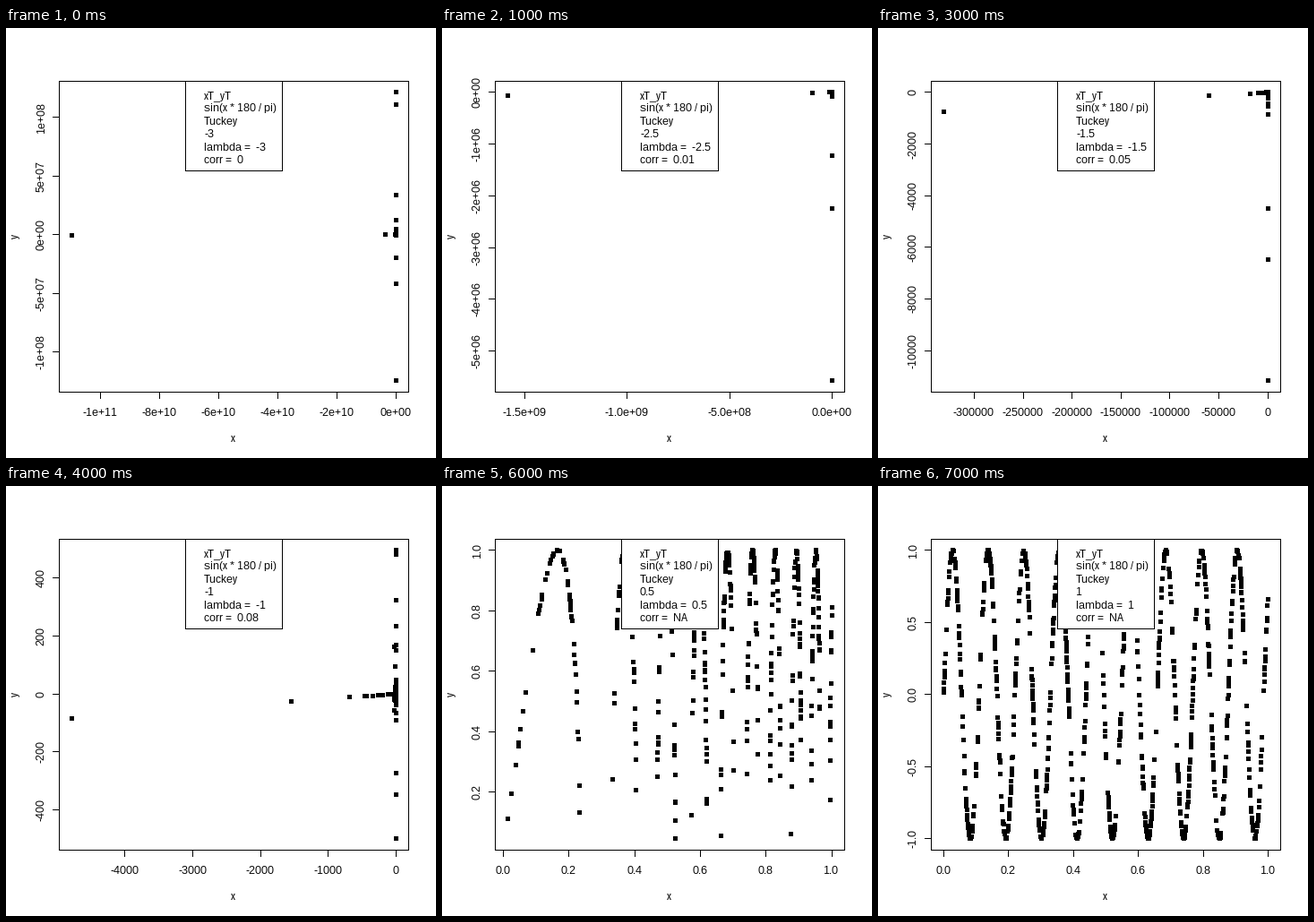
Write a matplotlib script that moves like this. It is 480x480 px and loops after 8000 ms.

```python
import numpy as np
import matplotlib.pyplot as plt
from matplotlib.animation import FuncAnimation
from matplotlib.collections import PatchCollection
from matplotlib.patches import Circle, Rectangle

plt.rcParams["font.family"] = "Liberation Sans"
plt.rcParams["font.size"] = 12
plt.rcParams["text.hinting"] = "native"
plt.rcParams["text.hinting_factor"] = 1

SIZE, DPI = 480, 72          # at 72 dpi one point is one pixel
LEFT, RIGHT, TOP, BOTTOM = 59.04, 449.76, 59.04, 406.56
FREQ = 180 / np.pi

# lambda and correlation shown in the legend
STEPS = [(-3, "0"), (-2.5, "0.01"), (-2, "0.01"), (-1.5, "0.05"),
         (-1, "0.08"), (-0.5, "0.18"), (0.5, "NA"), (1, "NA")]

# smallest x values, which become the outliers on the left
SMALL_X = [.000209, .000648, .001466, .00214, .0023, .0029, .00384, .00493,
           .0081]

# zero crossing number and 1/y of the points closest to the zero line
NEAR_ZERO = [
    (5, 499.5), (8, 347.5), (14, 272), (5, 91), (6, 67), (1, 57),
    (13, -495), (4, -480.5), (9, -324), (16, -233), (11, -170),
    (1, -163), (7, -150), (3, -96),
]


def sample_x():
    x = np.random.default_rng(7).uniform(0.0085, 0.9995, 980)
    x = x[np.abs(np.sin(x * FREQ)) > 0.02]
    near = [(k * np.pi + (-1) ** k * np.arcsin(1 / inv)) / FREQ
            for k, inv in NEAR_ZERO]
    return np.concatenate([x, near, SMALL_X, [0.9995]])


X = sample_x()
Y = np.sin(X * FREQ)


def tukey(values, lam):
    with np.errstate(invalid="ignore"):
        return np.sign(lam) * np.power(values, float(lam))


def scale(values, start, end):
    """Map the data range, widened by 4% on each side, to start..end."""
    low, high = np.nanmin(values), np.nanmax(values)
    pad = 0.04 * (high - low)
    low, high = low - pad, high + pad
    return low, high, lambda v: start + (v - low) / (high - low) * (end - start)


def pretty_ticks(low, high):
    """Ticks at 1, 2 or 5 times a power of ten, about five of them."""
    cell = (high - low) / 5
    base = step = 10.0 ** np.floor(np.log10(cell))
    for factor, bias in ((2, 0.8), (5, 1.7), (10, 0.8)):
        if factor * base - cell < bias * (cell - step):
            step = factor * base
    numbers = np.arange(np.ceil(low / step), np.floor(high / step) + 1)
    return numbers * step + 0.0, step


def tick_labels(ticks, step):
    """Fixed notation unless scientific notation is shorter."""
    decimals = max(0, -int(np.floor(np.log10(step))))
    fixed = [f"{t:.{decimals}f}" for t in ticks]
    short = [f"{t:.0e}" for t in ticks]
    if not np.allclose([float(s) for s in short], ticks):
        short = [f"{t:.1e}" for t in ticks]
    return fixed if max(map(len, fixed)) <= max(map(len, short)) else short


fig = plt.figure(figsize=(SIZE / DPI, SIZE / DPI), dpi=DPI, facecolor="white")
ax = fig.add_axes([0, 0, 1, 1])


def line(xs, ys):
    ax.plot(xs, ys, color="black", lw=1, antialiased=False,
            solid_capstyle="projecting")


def box(x0, y0, x1, y1, fill, z):
    ax.add_patch(Rectangle((x0, y0), x1 - x0, y1 - y0, facecolor=fill,
                           edgecolor="black", lw=1, antialiased=False,
                           joinstyle="miter", zorder=z))


def label(x, y, text, rotation=0, ha="center"):
    ax.text(x, y, text, rotation=rotation, rotation_mode="anchor", ha=ha,
            va="baseline", color="black", zorder=6)


def dots(xs, ys):
    centres = np.floor(np.column_stack([xs, ys])) + 0.5
    ax.add_collection(PatchCollection(
        [Circle(c, 2.5) for c in centres], facecolor="black", linewidth=0,
        antialiased=False, zorder=3))


def draw(i):
    lam, corr = STEPS[i]
    ax.clear()
    ax.set(xlim=(0, SIZE), ylim=(SIZE, 0))
    ax.axis("off")

    xt, yt = tukey(X, lam), tukey(Y, lam)
    x_low, x_high, to_x = scale(xt, LEFT, RIGHT)
    y_low, y_high, to_y = scale(yt, BOTTOM, TOP)
    ok = np.isfinite(yt)
    dots(to_x(xt[ok]), to_y(yt[ok]))

    box(59, 59, 449, 406, "none", 4)
    ticks, step = pretty_ticks(x_low, x_high)
    for px, text in zip(to_x(ticks), tick_labels(ticks, step)):
        line([np.floor(px)] * 2, [406, 413])
        label(px - 0.5, 433, text)
    ticks, step = pretty_ticks(y_low, y_high)
    for py, text in zip(to_y(ticks), tick_labels(ticks, step)):
        line([52, 59], [np.floor(py)] * 2)
        label(42.5, py, text, 90)
    label(253.5, 462, "x")
    label(13.5, 232.5, "y", 90)

    box(200, 59, 308, 159, "white", 5)
    rows = ["xT_yT", "sin(x * 180 / pi)", "Tuckey", f"{lam}",
            f"lambda =  {lam}", f"corr =  {corr}"]
    for n, row in enumerate(rows):
        label(221, round(79 + 14.4 * n), row, ha="left")
    return []


anim = FuncAnimation(fig, draw, frames=len(STEPS), init_func=lambda: [],
                     interval=1000, repeat=True, repeat_delay=0)
plt.show()
```
